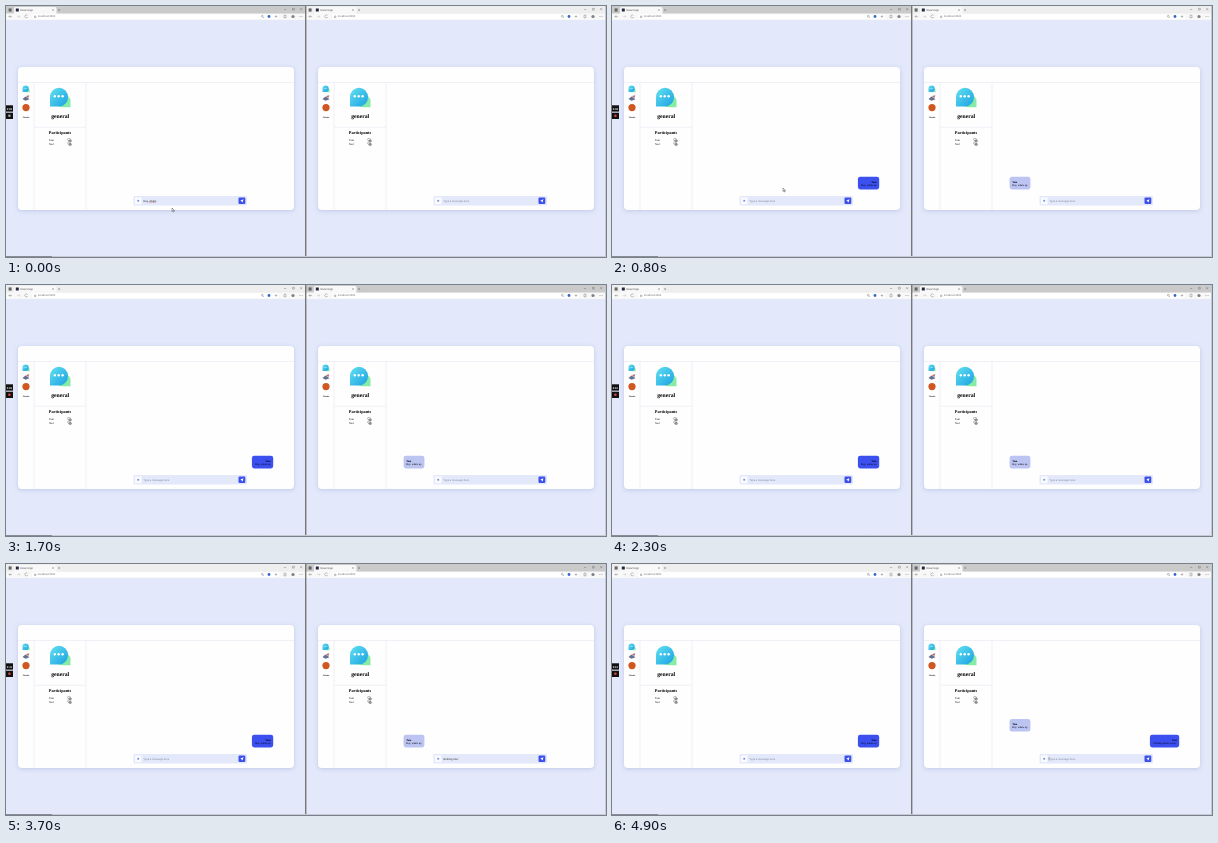
These frames come from a looping animation (600 by 251 pixels, 5000 ms). An HTML page:

```html
<!DOCTYPE html>
<html lang="en">
<head>
<meta charset="utf-8">
<title>Two-window chat</title>
<style>
  html, body { margin: 0; width: 100%; height: 100%; overflow: hidden; background: #e3e9fb; }
  svg { display: block; width: 600px; height: 251px; text-rendering: geometricPrecision; }
  text { white-space: pre; }
  .sans { font: 2.7px "Liberation Sans", Arial, sans-serif; }
  .serif { font: 2.7px "Liberation Serif", Times, serif; }
  .bold { font-weight: bold; }
  .mid { text-anchor: middle; }
  .end { text-anchor: end; }
  .line { fill: none; stroke: #555; stroke-width: .35; }
  .rule { fill: none; stroke: #ebebf2; stroke-width: .7; }
  #card { filter: drop-shadow(0 1px 2px #9ca8d080); }
</style>
</head>
<body>
<svg viewBox="0 0 600 251">
  <defs>
    <linearGradient id="cyan" x1="0" y1="0" x2="1" y2="1">
      <stop stop-color="#62e2f0"/><stop offset="1" stop-color="#1b9fe2"/>
    </linearGradient>
    <g id="talk">
      <path d="M64.5 101.3V95a7.5 6.3 0 1 0-7.5 6.3z" fill="#86eba4"/>
      <path d="M44 100.6V91.2a9 9.4 0 1 1 9 9.4z" fill="url(#cyan)"/>
      <g fill="#fff"><circle cx="48.8" cy="90.2" r="1.2"/><circle cx="52.7" cy="90.2" r="1.2"/><circle cx="56.6" cy="90.2" r="1.2"/></g>
    </g>
    <g id="chat" fill="#fff" stroke="#666" stroke-width=".45">
      <rect x="61.7" y="-1.7" width="2.7" height="2.1" rx=".7"/>
      <rect x="62.9" y="-.3" width="2.5" height="1.9" rx=".7" fill="#999"/>
    </g>
    <g id="window">
      <path d="M8 7.5V2.5q0-1.5 1.5-1.5H49q1.5 0 1.5 1.5V7.5H300V14H0V7.5z" fill="#f8f8f8"/>
      <rect x="2.6" y="2.4" width="3" height="3.2" fill="#666"/>
      <rect x="9.8" y="2.5" width="3" height="3" fill="#20283c"/>
      <text class="sans" x="14.5" y="5.1" fill="#444">React App</text>
      <path class="line" d="M46.2 3.2l1.6 1.6m0-1.6l-1.6 1.6M52 4h2.2m-1.1-1.1v2.2M278 3.5h2.2M286.5 2.3h1.8v1.8h-1.8zM294.2 2.2l2 2m0-2l-2 2"/>
      <rect x="26" y="8.2" width="247" height="4.8" rx="2" fill="#fff"/>
      <path class="line" d="M6 10.5H3l1.2-1.2M3 10.5l1.2 1.2M21.5 9.5a1.5 1.5 0 1 0 .2 1.5M28.5 10h1.4v1.6h-1.4zM257 11l1 1M270 9.2v2.6m-1.3-1.3h2.6M278 9.2h2v2.6h-2z"/>
      <path class="line" d="M11 10.5h3l-1.2-1.2M14 10.5l-1.2 1.2" opacity=".4"/>
      <text class="sans" x="32" y="11.4" fill="#666">localhost:3000</text>
      <circle class="line" cx="256.3" cy="10.2" r=".9"/>
      <circle cx="263" cy="10.5" r="1.4" fill="#3765c7"/>
      <circle cx="287" cy="10.5" r="1.6" fill="#7d8088"/>
      <path d="M293.5 10.5h3" stroke="#555" stroke-width=".5" stroke-dasharray=".6"/>
      <rect id="card" x="12" y="61" width="276" height="143" rx="4" fill="#fefeff"/>
      <path class="rule" d="M12 76.5H288M28 76.5V204M80 76.5V204M28 121.3H80"/>
      <use href="#talk"/>
      <use href="#talk" transform="translate(1.3 51.3) scale(.345)"/>
      <path d="M16.5 93l3-2.5 4 2.8-4 1.5z" fill="#65708f"/><path d="M20 90l3.3-.7-1 3z" fill="#b86868"/>
      <circle cx="20" cy="101.6" r="3.6" fill="#d0571f"/>
      <text class="serif bold mid" x="20" y="112" style="font-size:2.3px">Create</text>
      <text class="serif bold mid" x="54.2" y="111.7" style="font-size:5.7px">general</text>
      <text class="serif bold mid" x="54" y="128.3" style="font-size:4.3px">Participants</text>
      <text class="serif" x="43" y="135.2">Tam</text>
      <text class="serif" x="43" y="138.7">Ned</text>
      <use href="#chat" y="134.2"/><use href="#chat" y="137.8"/>
      <rect x="127.5" y="190" width="113.5" height="9.6" rx="1" fill="#e3e9fb"/>
      <rect x="129" y="191.4" width="6.5" height="6.8" fill="#fafbff"/>
      <path d="M131.2 194.8h2m-1-1v2" stroke="#4654c8" stroke-width=".6"/>
      <rect x="232.5" y="191.5" width="6.8" height="6.6" rx="1" fill="#3c50ec"/>
      <path d="M234.4 194.6l3-1.3-.8 3.2-.9-1.1z" fill="#fff"/>
    </g>
  </defs>
  <g id="panes"></g>
  <rect x="299" width="1.4" height="251" fill="#777"/>
  <path d="M599.5 0V250.5H0" fill="none" stroke="#c6c9d2"/>
  <rect y="250" width="46" height="1" fill="#8a8c94"/>
  <rect y="99.3" width="7" height="6.3" fill="#111"/>
  <rect y="106.7" width="7" height="6.3" fill="#111"/>
  <text id="clock" class="sans bold mid" x="3.4" y="103.5" fill="#fff"></text>
  <circle id="record" cx="3.4" cy="109.8" r="1.3"/>
  <path id="mouse" d="M0 0v3.4l.8-.7.6 1.3.7-.3-.6-1.2h1z" fill="#fff" stroke="#222" stroke-width=".4"/>
</svg>
<script>
const LOOP = 5000, SENT_LEFT = 500, SWITCH = 1700, FOCUS_RIGHT = 2000, SENT_RIGHT = 4600;
const HELLO = 'Hey, whats up', REPLY = 'Nothing much wsup';
const $ = id => document.getElementById(id);

const bubble = (x, y, width, own, name, message) => {
  const edge = own ? x + width - 2.7 : x + 2.6, side = own ? 'end' : '';
  return `<rect x="${x}" y="${y}" width="${width}" height="12.6" rx="2.3" fill="${own ? '#3c50f0' : '#bcc4f2'}"/>
    <text class="serif bold ${side}" x="${edge}" y="${y + 5.7}">${name}</text>
    <text class="serif ${side}" x="${edge}" y="${y + 9.3}">${message}</text>`;
};

const pane = (x, active, typed, caret, bubbles) => `<g transform="translate(${x})">
  <rect width="300" height="8" fill="${active ? '#cacaca' : '#efeeee'}"/>
  <use href="#window"/>
  <text class="sans" x="137.3" y="195.8" fill="${typed ? '#222' : '#7d8396'}">${typed || 'Type a message here'}</text>
  ${caret ? '<path d="M137 193.2v3.2" stroke="#222" stroke-width=".4"/>' : ''}
  ${typed.startsWith('Hey') ? '<path d="M143.3 196.5h6.6" stroke="#d66" stroke-width=".4"/>' : ''}
  ${bubbles}</g>`;

// Straight moves between [time, x, y] stops
const route = [[0, 166, 202], [600, 168, 199], [800, 171, 182], [1200, 176, 221], [1500, 180, 252]];
function mouseAt(t) {
  const i = route.findIndex(stop => stop[0] > t);
  if (i < 0) return [0, 260];
  const [a, b] = [route[i - 1], route[i]], k = (t - a[0]) / (b[0] - a[0]);
  return [1, 2].map(n => a[n] + (b[n] - a[n]) * k);
}

let shown = -1;
function draw(now) {
  const t = Math.floor(now % LOOP / 100) * 100;
  if (t !== shown) {
    shown = t;
    const rightActive = t >= SWITCH, sent = t >= SENT_LEFT, answered = t >= SENT_RIGHT;
    const blink = t % 1060 >= 270 && t % 1060 < 800;
    const hello = sent ? '' : HELLO.slice(0, 10 + Math.max(0, t / 100 - 1));
    const reply = answered ? '' : REPLY.slice(0, Math.max(0, Math.floor((t - 2400) / 117)));
    $('panes').innerHTML =
      pane(0, !rightActive, hello, !rightActive && !hello && blink,
        sent ? bubble(245.9, 170.8, 21.3, true, 'Tam', HELLO) : '') +
      pane(300, rightActive, reply, t >= FOCUS_RIGHT && !reply && blink,
        (sent ? bubble(97.6, answered ? 155 : 170.8, 20.8, false, 'Tam', HELLO) : '') +
        (answered ? bubble(237.9, 170.8, 29.3, true, 'Ned', REPLY + '?') : ''));
    $('clock').textContent = '0:' + String(8 + Math.floor(t / 1000)).padStart(2, '0');
    $('record').setAttribute('fill', t < 100 ? '#aaa' : '#d8453a');
    $('mouse').setAttribute('transform', `translate(${mouseAt(t)})`);
  }
  requestAnimationFrame(draw);
}
draw(0);
</script>
</body>
</html>
```
